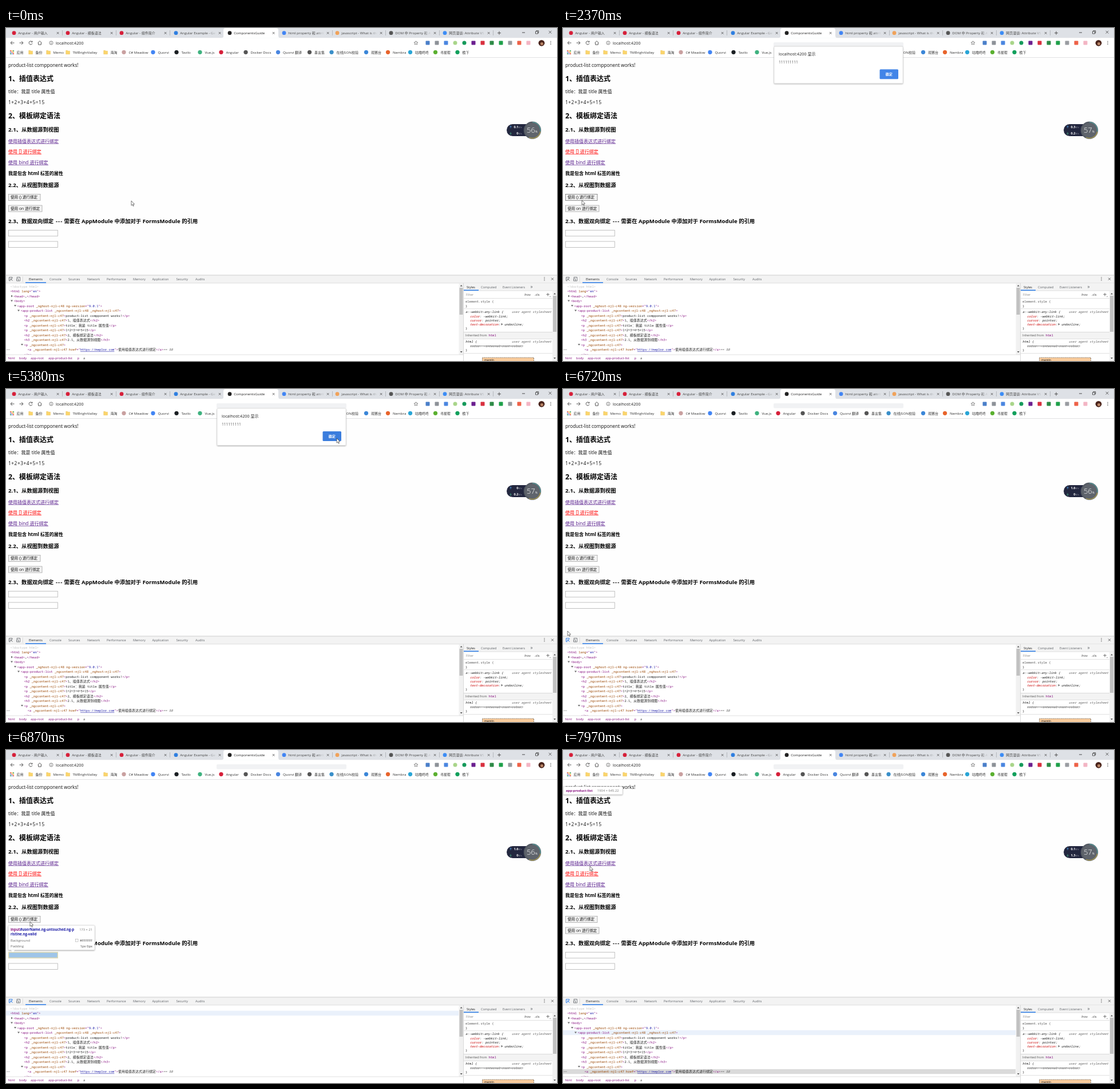
These frames come from a looping animation (963x582 px, 8000 ms). An HTML page:

```html
<!DOCTYPE html>
<html lang="zh-CN">
<head>
<meta charset="utf-8">
<title>ComponentsGuide</title>
<style>
html, body { margin: 0; width: 100%; height: 100%; overflow: hidden; background: #fefefe; }
svg { display: block; width: 100vw; height: 100vh; }
text { font-family: 'Open Sans', 'Noto Sans CJK SC', 'Noto Sans CJK', sans-serif; white-space: pre; }
.mono { font-family: 'Noto Sans Mono', 'Noto Sans CJK SC', 'Noto Sans CJK', monospace; }
</style>
</head>
<body>
<svg id="stage" viewBox="0 0 963 582" xmlns="http://www.w3.org/2000/svg"></svg>
<script>
const LOOP = 8000;
const PURPLE = '#881280', BROWN = '#994500', NAVY = '#1a1aa6', GREY = '#5f6368';

// Drawing helpers
const esc = s => s.replace(/&/g, '&amp;').replace(/</g, '&lt;');
const attrs = o => Object.entries(o).map(([k, v]) => ` ${k}="${v}"`).join('');
const runs = (s, size, scale) => s.split(/([\u3000-\u9fff\uff00-\uffef]+)/).map((p, i) =>
  p && `<tspan font-size="${(i % 2 ? size : size * scale).toFixed(2)}">${esc(p)}</tspan>`).join('');
const text = (x, y, s, size, fill = '#111', o = {}) =>
  `<text x="${x}" y="${y}" fill="${fill}"${attrs(o)}>${runs(s, size, 1.03)}</text>`;
const mono = (x, y, s, fill = '#222', o = {}) =>
  `<text class="mono" x="${x}" y="${y}" fill="${fill}"${attrs(o)}>${runs(s, 6, 11 / 12)}</text>`;
const rect = (x, y, w, h, fill, o = {}) =>
  `<rect x="${x}" y="${y}" width="${w}" height="${h}" fill="${fill}"${attrs(o)}/>`;
const dot = (x, y, r, fill, o = {}) => `<circle cx="${x}" cy="${y}" r="${r}" fill="${fill}"${attrs(o)}/>`;
const path = (d, stroke = GREY, width = 1, fill = 'none', o = {}) =>
  `<path d="${d}" fill="${fill}" stroke="${stroke}" stroke-width="${width}"${attrs(o)}/>`;
const group = (id, body, o = {}) => `<g id="${id}"${attrs(o)}>${body}</g>`;
const square = (x, y, s, fill) => rect(x - s / 2, y - s / 2, s, s, fill, { rx: 1 });
const cross = (x, y, r, width = .8) =>
  path(`M${x - r} ${y - r}l${2 * r} ${2 * r}m0 ${-2 * r}l${-2 * r} ${2 * r}`, '#444', width);

function tabStrip() {
  const tabs = [
    [14, 'Angular - 用户输入', '#d6203a'], [108, 'Angular - 模板语法', '#d6203a'],
    [202, 'Angular - 组件简介', '#d6203a'], [297, 'Angular Example - Get', '#2f7fe0'],
    [391, 'ComponentsGuide', '#222'], [486, 'html property 和 attribute', '#4285f4'],
    [579, 'javascript - What is the', '#f0a25a'], [673, 'DOM 中 Property 和 Attr', '#555'],
    [767, '网页漫谈: Attribute VS', '#3d8df5']];
  let out = rect(0, 0, 963, 17.5, '#dee1e6') +
    path('M376 17.5q4 0 4-4V4q0-4 4-4h88q4 0 4 4v9.5q0 4 4 4z', 'none', 0, '#fff');
  tabs.forEach(([x, name, color], i) => {
    const active = i === 4;
    out += dot(x, 8.7, 3.4, color) + text(x + 7.2, 11, name, 6, active ? '#222' : '#444');
    if (!active) out += rect(x + 57, 2, 13, 14, 'url(#fade)') + rect(x + 70, 2, 13, 14, '#dee1e6');
    out += cross(x + 76.6, 8.8, 1.8);
    if (i < 3 || i > 4) out += rect(x + 84, 4, .6, 9, '#9a9da2');
  });
  return out + path('M862 5.7v6M859 8.7h6', '#444', .9) + path('M902 8h5', '#222', .8) +
    path('M925.5 6h4v4h-4zM926.8 6v-1.3h4v4h-1.2', '#222', .7) + cross(951, 7.2, 2.4);
}

function toolbar() {
  let out = rect(0, 17.5, 963, 34.5, '#fff') +
    path('M14.5 26h-6.5m3-3l-3 3 3 3M23.5 26h6.5m-3-3l3 3-3 3', '#444', .9) +
    path('M45.6 24.2a3 3 0 1 0 .4 2.7M46 22.6v2h-2', '#444', .9) +
    path('M55.5 26l3.5-3.3 3.5 3.3M56.7 25.6v3.6h4.6v-3.6', '#444', .9) +
    dot(79, 26, 3.1, 'none', { stroke: '#555', 'stroke-width': .7 }) + path('M79 25.5v2.4M79 24v.8', '#555', .8) +
    text(87, 28.6, 'localhost:4200', 7, '#222') +
    path('M716.5 22.7l1 2.2 2.4.2-1.8 1.6.5 2.3-2.1-1.2-2.1 1.2.5-2.3-1.8-1.6 2.4-.2z', '#555', .7);
  const ext = ['#4a7fc9', '#8d9298', '#4a86e0', '#a9d58a', '#159a5b', '#6b1f8f', '#d8303f',
    '#2d8a46', '#1fa04a', '#9a9da2', '#ee6248', '#f3b5c4'];
  ext.forEach((c, i) => out += i === 3 || i === 4 ? dot(737 + i * 16, 26, 3.5, c) : square(737 + i * 16, 26, 7, c));
  out += dot(936, 26.3, 5.4, '#4a241c') + dot(936.5, 27.5, 2.5, '#b98566');
  [23.5, 26, 28.5].forEach(y => out += dot(952, y, .7, '#444'));

  for (let i = 0; i < 9; i++)
    out += rect(7 + i % 3 * 2.6, 39 + Math.floor(i / 3) * 2.6, 1.8, 1.8, ['#e0483e', '#f0b42a', '#3c9d5a', '#4a86e8'][i % 4]);
  out += text(18.5, 44.7, '应用', 6, '#333');
  const marks = [
    [43, '备份'], [74, 'Memo'], [108, 'TMBrightValley'], [174, '海淘'],
    [206, 'C# Meadow', '#c9a0a0'], [257, 'Quorvi', '#4285f4'], [298, 'Tavilo', '#1b1f23'],
    [339, 'Vue.js', '#3fb27f'], [376, 'Angular', '#d6203a'], [419, 'Docker Docs', '#555'],
    [475.5, 'Quorvi 翻译', '#4a86e0'], [530.5, '墨言集', '#555'], [569, '在线JSON校验', '#3a8fc9'],
    [629.5, '观赛台', '#3b86d8'], [667.5, 'Nembra', '#e8642c'], [706.5, '咕噜咚咚', '#29a5d6'],
    [750.5, '寻屋帮', '#5bb030'], [789, '檐下', '#12a05c']];
  marks.forEach(([x, name, color]) => {
    out += color ? dot(x, 42.3, 3.6, color)
      : path(`M${x - 3.3} 39.2h2.7l.8 1h3.3v5.5h-6.8z`, '#e2b94f', .4, '#fbd56b');
    out += text(x + 8.4, 44.7, name, 6, '#333');
  });
  return out + rect(0, 51.3, 963, .7, '#d4d6d9');
}

function page() {
  const bold = { 'font-weight': 700 };
  const link = (y, s, end, color) => text(4, y, s, 8, color) + rect(4, y + 1, end - 4, .6, color);
  const button = (id, y, w, s) =>
    rect(4.3, y, w, 11, '#f3f3f3', { id, stroke: '#999', 'stroke-width': .7 }) + text(8, y + 7.9, s, 6.6);
  const input = y => rect(4.3, y, 86, 10.5, '#fff', { stroke: '#a8a8a8', 'stroke-width': .7 });
  const h3 = (x, y, s, o = {}) => text(x, y, s, 9.36, '#000', { ...bold, ...o });
  return text(4, 68, 'product-list compponent works!', 8) +
    text(4, 93, '1、插值表达式', 12, '#000', bold) +
    text(4, 114.3, 'title：我是 title 属性值', 8) +
    text(4, 133, '1+2+3+4+5=15', 8, '#111', { 'letter-spacing': .6 }) +
    text(4, 158, '2、模板绑定语法', 12, '#000', bold) +
    h3(4, 181, '2.1、从数据源到视图') +
    link(200.8, '使用插值表达式进行绑定', 92, '#551a8b') +
    link(219.3, '使用 [] 进行绑定', 62, '#f00') +
    link(238, '使用 bind 进行绑定', 74, '#551a8b') +
    text(4, 256.5, '我是包含 html 标签的属性', 8, '#000', bold) +
    h3(4, 278, '2.2、从视图到数据源') +
    button('btnA', 290.5, 55.7, '使用 () 进行绑定') +
    button('btnB', 310, 58.7, '使用 on 进行绑定') +
    h3(4, 341, '2.3、数据双向绑定') + h3(87, 341, '---', { 'letter-spacing': 1 }) +
    h3(101.5, 341, '需要在 AppModule 中添加对于 FormsModule 的引用') +
    input(353.3) + input(373);
}

// Colours one line of markup
function markup(x, y, line) {
  const span = (s, fill, extra = '') => `<tspan fill="${fill}"${extra}>${runs(s, 6, 11 / 12)}</tspan>`;
  const body = line.replace(/<[^>]+>|[^<]+/g, part => {
    if (part[0] !== '<') return span(part, '#222');
    const [, open, list, close] = part.match(/^(<\/?[\w-]+)(.*)(>)$/);
    let out = span(open, PURPLE);
    for (const [, name, value] of list.matchAll(/ ([\w-]+)(?:="([^"]*)")?/g)) {
      out += span(' ' + name, BROWN);
      if (value) out += span('="', PURPLE) +
        span(value, NAVY, name === 'href' ? ' text-decoration="underline"' : '') + span('"', PURPLE);
    }
    return out + span(close, PURPLE);
  });
  return `<text class="mono" x="${x}" y="${y}">${body}</text>`;
}

function elementsPanel() {
  const scope = '_ngcontent-njl-c47';
  const lines = [
    [7.5, '<html lang="en">'], [13, '<head>…</head>', 'closed'], [13.5, '<body>', 'open'],
    [19.5, '<app-root _nghost-njl-c48 ng-version="9.0.1">', 'open'],
    [25.5, '<app-product-list _ngcontent-njl-c48 _nghost-njl-c47>', 'open'],
    [31.5, `<p ${scope}>product-list compponent works!</p>`],
    [31.5, `<h2 ${scope}>1、插值表达式</h2>`],
    [31.5, `<p ${scope}>title：我是 title 属性值</p>`],
    [31.5, `<p ${scope}>1+2+3+4+5=15</p>`],
    [31.5, `<h2 ${scope}>2、模板绑定语法</h2>`],
    [31.5, `<h3 ${scope}>2.1、从数据源到视图</h3>`],
    [31.5, `<p ${scope}>`, 'open'],
    [37.5, `<a ${scope} href="https://meplor.com">使用插值表达式进行绑定</a>`],
    [31.5, '</p>']];
  let out = rect(0, 432, 963, 150, '#fff') + rect(0, 432, 963, 14, '#f3f3f3') +
    rect(0, 431.6, 963, .7, '#bbb') + rect(0, 445.6, 963, .6, '#ccc') +
    group('inspect', path('M11 437.5v-1.8h-5.5v6h2M8 438.2l3.6 3.6M8 441v-2.8h2.8', 'currentColor', .9)) +
    path('M19 437v-1.5h5.5v6.5h-3M18.5 438h3v4h-3z', GREY, .8) + rect(28.8, 434, .6, 10, '#ccc');
  [[40, 'Elements'], [76, 'Console'], [109, 'Sources'], [142, 'Network'], [176, 'Performance'],
    [222, 'Memory'], [255.5, 'Application'], [297.5, 'Security'], [331, 'Audits']]
    .forEach(([x, s], i) => out += text(x, 441, s, 5.4, i ? GREY : '#222'));
  out += rect(34, 444.3, 36, 1.4, '#1a73e8') + cross(955, 438.6, 2);
  [436, 438.5, 441].forEach(y => out += dot(941, y, .7, '#555'));

  out += rect(0, 0, 791, 8.5, '#eaf1fb', { id: 'hoverRow' }) + rect(0, 557.8, 791, 8.4, '#dadada', { id: 'picked' });
  out += mono(7.5, 453.5, '<!doctype html>', '#c0c0c0');
  lines.forEach(([x, s, arrow], i) => {
    const y = 460 + i * 8.5;
    out += markup(x, y + 2, s);
    if (arrow) out += path(arrow === 'open' ? `M${x - 5.5} ${y - 1.5}h4l-2 3z` : `M${x - 4} ${y - 2}v4l3-2z`, 'none', 0, '#6e6e6e');
  });
  out += mono(275, 564, '== $0', '#666', { 'font-style': 'italic' });
  [2, 4, 6].forEach(x => out += dot(x, 562, .6, '#555'));
  out += rect(791.5, 446, 8, 125, '#f1f1f1') + rect(792.5, 454, 6, 47, '#c1c1c1') +
    path('M793.7 451.5h4l-2-2.5zM793.7 565h4l-2 2.5z', 'none', 0, '#555') +
    rect(0, 571, 800, 11, '#fff') + rect(0, 570.7, 800, .6, '#ccc');
  [[3.5, 'html'], [23, 'body'], [43, 'app-root'], [74, 'app-product-list'], [124.5, 'p'], [135, 'a']]
    .forEach(([x, s], i) => out += text(x, 579, s, 5.5, i === 5 ? '#333' : PURPLE));
  return out;
}

function stylesPanel() {
  const it = { 'font-style': 'italic' };
  const rule = y => rect(800, y, 155, .6, '#ccc');
  const prop = (y, name, value) => mono(811, y, name, '#c80000', it) + mono(811 + name.length * 3.3, y, value, '#222', it);
  let out = rect(799.5, 446, 163.5, 136, '#fff') + rect(799.5, 446, 163.5, 13, '#f3f3f3') +
    rect(799.3, 446, .7, 136, '#ccc') + rect(800, 458.8, 163, .6, '#ccc') + rect(800, 457.6, 26, 1.4, '#1a73e8');
  [[805, 'Styles'], [830, 'Computed'], [868, 'Event Listeners'], [916.5, '»']]
    .forEach(([x, s], i) => out += text(x, 454.8, s, i === 3 ? 8 : 5.4, i ? GREY : '#222'));
  return out + text(804, 468, 'Filter', 5.4, '#888') + text(905.5, 468, ':hov', 5.6, '#333') +
    text(924, 468, '.cls', 5.6, '#333') + path('M947 463v5.5M944.3 465.7h5.5', '#555', .8) +
    path('M950 470h1.5v-1.5z', 'none', 0, '#555') + rule(472) +
    mono(803, 479.5, 'element.style {', '#555') + mono(803, 487.7, '}') + rule(490.5) +
    mono(803, 498, 'a:-webkit-any-link {', '#222', it) + mono(884, 498, 'user agent stylesheet', '#666', it) +
    prop(505.5, 'color', ': -webkit-link;') + prop(512.5, 'cursor', ': pointer;') +
    prop(519.7, 'text-decoration', ':') + path('M865.5 515.8v4l3-2z', 'none', 0, '#6e6e6e') +
    mono(871, 519.7, 'underline;', '#222', it) + mono(803, 527, '}') +
    rect(800, 531, 155, 12, '#f3f3f3') + rule(531) + rule(543) +
    text(803, 539, 'Inherited from', 5.4, '#555') + mono(843.5, 539, 'html', PURPLE) +
    mono(803, 550, 'html {', '#222', it) + mono(884, 550, 'user agent stylesheet', '#666', it) +
    mono(811, 557.5, 'color: -internal-root-color;', '#777', it) + rect(811, 555.5, 93, .7, '#555') +
    mono(803, 565, '}') + rule(568.5) +
    rect(832.5, 576, 90, 8, '#f9cc9d', { stroke: '#222', 'stroke-width': .6, 'stroke-dasharray': '2 1.5' }) +
    text(836, 581.8, 'margin', 5, '#222') +
    rect(955, 460, 8, 122, '#f1f1f1') + rect(956, 468, 6, 63, '#c1c1c1') +
    path('M957 465.5h4l-2-2.5zM957 576h4l-2 2.5z', 'none', 0, '#555');
}

function meter() {
  const label = (id, y) => `<text id="${id}" x="895.5" y="${y}" fill="#fff" font-size="5.6" font-weight="700" text-anchor="end"></text>` +
    text(895.8, y, 'K/s', 3.8, '#a9adbb');
  return rect(875, 168, 46, 21, '#23273f', { rx: 10.5 }) +
    path('M882 175v-4m-1.5 1.5l1.5-1.5 1.5 1.5', '#4fa0e8', .8) +
    path('M882 182v4m-1.5-1.5l1.5 1.5 1.5-1.5', '#49b08a', .8) +
    label('up', 175.3) + label('down', 186.3) +
    dot(920, 178.7, 15.2, '#555b64') + dot(920, 178.7, 12.8, '#5f646c') +
    path('M920 164.8a13.9 13.9 0 0 1 13.7 16.3', '#55a9a6', 1.1) +
    path('M933.7 181.1a13.9 13.9 0 0 1 -19.5 10.2', '#bba94f', 1.1) +
    '<text id="load" x="917.5" y="183" fill="#fff" font-size="12.5" font-weight="300" text-anchor="middle"></text>' +
    text(924.8, 183, '%', 4.8, '#eee');
}

const card = (x, y, w, h, fill = '#fff') =>
  rect(x, y, w, h, fill, { rx: 1.5, stroke: '#ccc', 'stroke-width': .5, filter: 'url(#shadow)' });

function overlays() {
  const bold = { 'font-weight': 700 }, end = { 'text-anchor': 'end' };
  const tint = (y, h, fill, x = 4, w = 952) => rect(x, y, w, h, fill, { opacity: .66 });
  const size = (x, y, s) => text(x, y, s, 5.6, '#777');
  const inputTip = rect(4, 353, 87, 11, '#e3dcae') + rect(5.3, 354.3, 84.4, 8.4, '#9fc5e8') +
    card(4, 306.5, 151, 43) + path('M8.5 349.5h7l-3.5 4z', 'none', 0, '#fff') +
    `<text x="8" y="315.5" font-size="6.1" font-weight="700"><tspan fill="${PURPLE}">input</tspan><tspan fill="${NAVY}">#userName.ng-untouched.ng-p</tspan></text>` +
    text(8, 324, 'ristine.ng-valid', 5.9, NAVY, bold) + text(151, 315.5, '173 × 21', 5.6, '#777', end) +
    text(8, 335, 'Background', 5.9, '#666') + text(151, 335, '#FFFFFF', 5.7, '#444', end) +
    rect(121.5, 330.5, 4.5, 4.5, '#fff', { stroke: '#999', 'stroke-width': .5 }) +
    text(8, 344.7, 'Padding', 5.9, '#666') + text(151, 344.7, '1px 0px', 5.7, '#444', end);
  const rootTip = tint(52, 338, '#6fa8dc', 0, 963) +
    card(4, 396, 66, 13) + text(8, 404.5, 'html', 5.8, PURPLE, bold) + size(25, 404.5, '1920 × 677');
  const headTip = tint(259, 9.4, '#f6b26b') + tint(268.4, 12.5, '#6fa8dc') + tint(280.9, 9.4, '#f6b26b') +
    card(4, 295, 62, 13) + text(8, 303.5, 'h3', 5.8, PURPLE, bold) + size(18, 303.5, '1904 × 25');
  const listTip = card(.5, 64, 103.5, 13.8) + text(5, 73.3, 'app-product-list', 5.7, PURPLE, bold) +
    size(60, 73.3, '1904 × 645.22');
  const hint = card(1.5, 447.3, 161.5, 11.7, '#f4f4f4') +
    text(5, 455, 'Select an element in the page to inspect it', 5.1, '#333') + text(160, 455, 'Ctrl + Shift + C', 5, '#777', end);
  const dialog = card(369, 34, 225, 64.5) + text(377, 50, 'localhost:4200 显示', 7, '#222') +
    text(377, 64, '111111111', 6.4, '#555') + rect(553.5, 74, 32.5, 17, '#4285e8', { rx: 1.5, id: 'ok' }) +
    text(563.7, 84.8, '确定', 6, '#fff', bold);
  return Object.entries({ rootTip, inputTip, headTip, listTip, hint, dialog }).map(([id, body]) => group(id, body)).join('');
}

document.getElementById('stage').innerHTML = `<defs>
  <linearGradient id="fade"><stop stop-color="#dee1e6" stop-opacity="0"/><stop offset="1" stop-color="#dee1e6"/></linearGradient>
  <filter id="shadow" x="-10%" y="-20%" width="120%" height="150%"><feDropShadow dx="0" dy=".8" stdDeviation="1.2" flood-opacity=".4"/></filter>
</defs>` + rect(0, 0, 963, 582, '#fefefe') + tabStrip() + toolbar() +
  rect(368, 25, 227, 8.5, '#f1f2f4', { id: 'trace', rx: 2 }) + page() + elementsPanel() + stylesPanel() + overlays() + meter() +
  group('cursor', path('M0 0V8.2l1.9-1.7 1.3 2.9 1.2-.5-1.3-2.9h2.5z', '#222', .6, '#fff'));

const FIRST = 262, STEP = 77.5;
const moves = [
  [0, 219, 302], [250, 219, 302], [640, 5, 437], [1110, 5, 437], [1140, 7, 437], [1270, 7, 437],
  [1980, 33, 301], [2420, 33, 301], [2890, 590, 63], [2960, 590, 63], [3120, 585, 79], [3270, 585, 79],
  [4130, 57, 311], [4470, 57, 311], [5050, 601, 112], [5090, 601, 112], [5370, 578, 86], [5510, 578, 86],
  [5960, 8, 437], [6620, 8, 437], [6690, 8, 423], [6700, 8, 423], [6845, 42, 300], [6900, 42, 300],
  [7730, 47, 203], [7800, 47, 203], [LOOP, 47, 203]];
const readings = [
  [0, '0.1', '0', 56], [650, '0.1', '0.2', 56], [1650, '0.3', '0.2', 57], [2650, '0', '0.1', 56],
  [3650, '1.9', '0', 57], [4650, '0', '0.2', 57], [5650, '0.4', '0.1', 56], [6650, '1.6', '0', 56],
  [7070, '1.6', '0', 57], [7650, '0.1', '1.3', 57]];
const dialogs = [[2220, 3270], [4320, 5510]];
const hints = [[980, 1300], [6210, 6400]];
const INSPECT = 6400;

const clamp = v => Math.max(0, Math.min(1, v));
const ease = k => k * k * (3 - 2 * k);
const el = id => document.getElementById(id);
const show = (id, on) => el(id).setAttribute('visibility', on ? 'visible' : 'hidden');
const shift = (id, x, y) => el(id).setAttribute('transform', `translate(${x.toFixed(2)} ${y.toFixed(2)})`);

function pointer(t) {
  const i = moves.findIndex(m => m[0] > t);
  const [a, b] = [moves[i - 1], moves[i]];
  const k = ease((t - a[0]) / (b[0] - a[0]));
  return [a[1] + (b[1] - a[1]) * k, a[2] + (b[2] - a[2]) * k];
}

// Shows a popup during its span; returns progress of its way in and out
function popup(id, spans, t, fadeIn, fadeOut) {
  const span = spans.find(([from, to]) => t >= from && t < to + fadeOut);
  show(id, span);
  if (!span) return [0, 0];
  const into = t - span[0], past = clamp((t - span[1]) / fadeOut);
  el(id).setAttribute('opacity', Math.min(clamp(into / fadeIn), 1 - past));
  return [into, past];
}

function draw(t) {
  const [x, y] = pointer(t);
  shift('cursor', x, y);

  const [, up, down, load] = readings.filter(r => r[0] <= t).pop();
  el('up').textContent = up;
  el('down').textContent = down;
  el('load').textContent = load;

  const [into, past] = popup('dialog', dialogs, t, 100, 150);
  shift('dialog', 0, -7 * ((1 - clamp(into / 270)) ** 2 + past));
  popup('hint', hints, t, 100, 80);
  show('trace', t >= 2350);

  const inspecting = t >= INSPECT;
  const over = (x0, y0, w, h) => !inspecting && x >= x0 && x <= x0 + w && y >= y0 && y <= y0 + h;
  el('ok').setAttribute('fill', over(553, 74, 33, 17) ? '#3b7ddd' : '#4285e8');
  el('btnA').setAttribute('stroke', over(4, 290, 56, 12) ? '#666' : '#999');
  el('btnB').setAttribute('stroke', over(4, 310, 59, 12) ? '#444' : '#999');

  el('inspect').setAttribute('color', inspecting ? '#1a73e8' : GREY);
  show('rootTip', t >= 6760 && t < 6840);
  show('inputTip', t >= 6840 && t < 6920);
  show('headTip', t >= 6920 && t < 7080);
  show('listTip', t >= 7230);
  show('hoverRow', t >= 6760);
  el('hoverRow').setAttribute('y', t < 6920 ? 455.7 : 489.7);
  show('picked', t >= 7230);
}

function frame() {
  const t = performance.now() % LOOP;
  draw(Math.max(0, FIRST + Math.floor((t - FIRST) / STEP) * STEP));
  requestAnimationFrame(frame);
}
frame();
</script>
</body>
</html>
```
